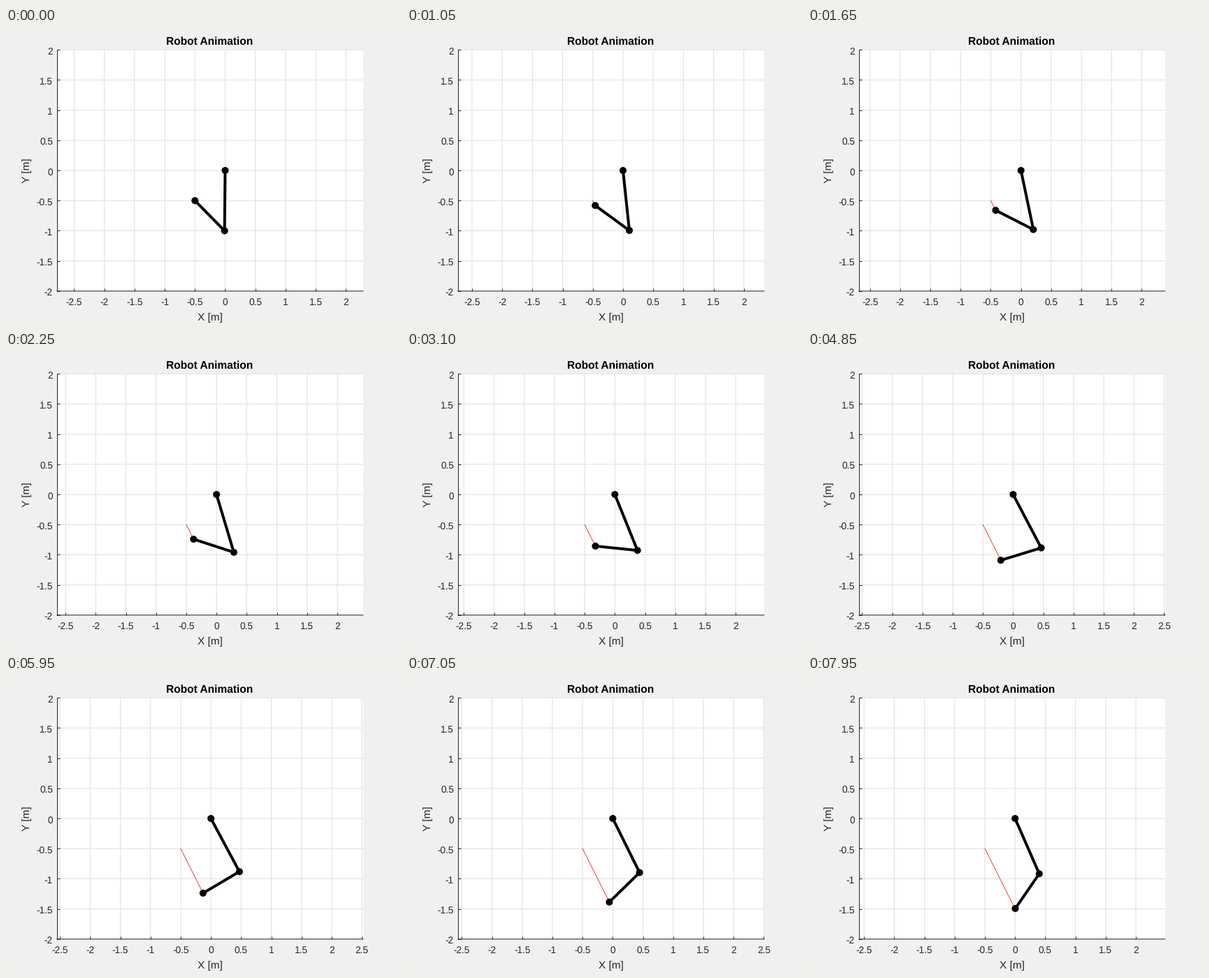
These frames come from a looping animation (565x424 px, 8 s). A matplotlib script:

```python
import math

import numpy as np
import matplotlib.pyplot as plt
from matplotlib.animation import FuncAnimation
from matplotlib.ticker import FuncFormatter, MultipleLocator
from matplotlib.transforms import ScaledTranslation

W, H, DPI = 565, 424, 100
PX = 72 / DPI                      # points per pixel
FRAMES, HOLD = 160, 9              # ticks of 50 ms, ticks spent at rest
L1, L2 = 1.0, 0.7                  # link lengths
HALF = 2.534                       # half the visible x range
CORNERS = np.array([(-0.5, -0.5), (0.0, -1.5), (0.5, -0.5)])
STEPS = 149                        # steps along each side of the path
ARM = 5 / 86.4                     # asterisk arm, 5 pixels in metres
INK = "#262626"

plt.rcParams["font.family"] = "Liberation Sans"
plt.rcParams["text.hinting"] = "none"


def tip(k):
    side, step = divmod(k, STEPS)
    a, b = CORNERS[side], CORNERS[side + 1]
    return a + (b - a) * step / STEPS


def elbow(p):
    r = math.hypot(*p)
    bend = math.acos((L1**2 + r**2 - L2**2) / (2 * L1 * r))
    angle = math.atan2(p[1], p[0]) + bend
    return np.array([L1 * math.cos(angle), L1 * math.sin(angle)])


def asterisks(points):
    """Four crossing strokes around each point, separated by gaps."""
    rows = []
    for p in points:
        for a in np.arange(4) * math.pi / 4:
            d = ARM * np.array([math.cos(a), math.sin(a)])
            rows += [p - d, p + d, (np.nan, np.nan)]
    return np.array(rows)


def label(value, pos):
    return f"{round(value, 1):g}"


fig = plt.figure(figsize=(W / DPI, H / DPI), dpi=DPI, facecolor="#f0f0f0")
ax = fig.add_axes([0.13 - 0.5 / W, 0.11 + 0.5 / H, 0.775, 0.815])
ax.set_ylim(-2, 2)
ax.set_axisbelow(True)
ax.grid(color="#dfdfdf", linewidth=PX, snap=False)
ax.tick_params(direction="in", length=4 * PX, width=PX, color=INK,
               labelcolor=INK, labelsize=13.6 * PX)
ax.tick_params(axis="x", pad=9.7 * PX)
ax.tick_params(axis="y", pad=6 * PX)
for axis in (ax.xaxis, ax.yaxis):
    axis.set_major_locator(MultipleLocator(0.5))
    axis.set_major_formatter(FuncFormatter(label))
for name, spine in ax.spines.items():
    spine.set_visible(name in ("left", "bottom"))
    spine.set_color(INK)
    spine.set_linewidth(PX)
ax.spines["bottom"].set_snap(False)

lower = ScaledTranslation(0, -1.4 / DPI, fig.dpi_scale_trans)
for t in ax.get_yticklabels():
    t.set_transform(t.get_transform() + lower)


def text(x, y, s, size, **kw):
    fig.text(x / W, 1 - y / H, s, fontsize=size * PX, ha="center", **kw)


text(291.5, 24, "Robot Animation", 15.5, va="baseline", color="black",
     weight="bold")
text(291.5, 419, "X [m]", 15.4, va="baseline", color=INK)
text(30, 204.5, "Y [m]", 15.4, va="center", color=INK, rotation=90)

trail, = ax.plot([], [], color="red", linewidth=0.75 * PX, zorder=3)
arm, = ax.plot([], [], color="black", linewidth=4 * PX, zorder=4,
               snap=False, solid_joinstyle="round", solid_capstyle="butt")
joints, = ax.plot([], [], color="black", linewidth=3.2 * PX, zorder=5,
                  snap=False, solid_capstyle="butt")


def draw(i):
    k = max(0, i - HOLD)
    end = tip(k)
    mid = elbow(end)
    chain = np.array([(0, 0), mid, end])
    arm.set_data(*chain.T)
    joints.set_data(*asterisks(chain).T)
    trail.set_data(*np.array([tip(j) for j in range(k + 1)]).T)
    # The view stays centred on everything drawn
    center = (CORNERS[0][0] + max(0, mid[0])) / 2
    ax.set_xlim(center - HALF, center + HALF)
    return arm, joints, trail


anim = FuncAnimation(fig, draw, frames=FRAMES, interval=50, repeat=True,
                     repeat_delay=0, blit=False)
plt.show()
```
